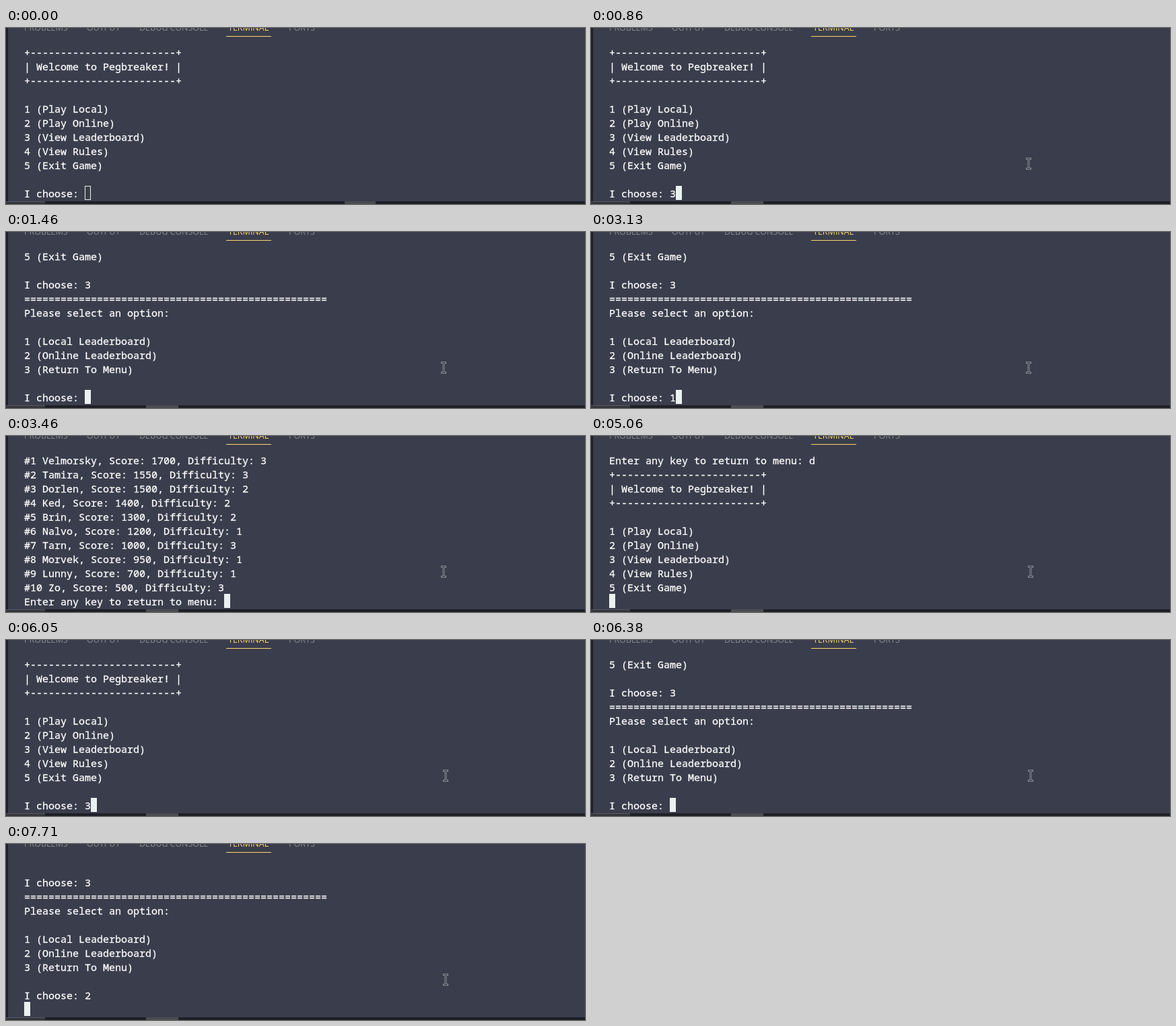
Animation of 860 by 262 pixels, one loop 8 s. Source, as an HTML page:

```html
<!DOCTYPE html>
<html lang="en">
<head>
<meta charset="utf-8">
<title>Terminal game</title>
<style>
html, body { margin: 0; width: 100%; height: 100%; overflow: hidden; background: #3a3d4b; }
svg { display: block; width: 860px; height: 262px; }
text { white-space: pre; }
.term {
  font: 15px "Noto Sans Mono", "DejaVu Sans Mono", monospace;
  fill: #fff; stroke: #fff; stroke-width: .3px;
}
.tabs { font: 12.5px "Open Sans", "Noto Sans", sans-serif; fill: #888d94; }
.tabs .on { fill: #ffd76d; }

.screen, .key, .cursor, .pointer, .idle, .focus { animation: 8s step-end infinite; }
.screen, .key { opacity: 0; }
.menu { animation-name: menu; }
.boards { animation-name: boards; }
.scores { animation-name: scores; }
.back { animation-name: back; }
.sent { animation-name: sent; }
.key3 { animation-name: key3; }
.key1 { animation-name: key1; }
.key2 { animation-name: key2; }
.keyD { animation-name: keyD; }
.cursor { animation-name: cursor; }
.pointer { animation-name: pointer; }
.idle { animation-name: idle; }
.focus { animation-name: focus; }

@keyframes menu { 0%, 64.125% { opacity: 1 } 18.25%, 79.75%, 100% { opacity: 0 } }
@keyframes boards { 0%, 43.25%, 96.375%, 100% { opacity: 0 } 18.25%, 79.75% { opacity: 1 } }
@keyframes scores { 0%, 63.25%, 100% { opacity: 0 } 43.25% { opacity: 1 } }
@keyframes back { 0%, 64.125%, 100% { opacity: 0 } 63.25% { opacity: 1 } }
@keyframes sent { 0%, 100% { opacity: 0 } 96.375% { opacity: 1 } }
@keyframes key3 { 0%, 18.25%, 79.75%, 100% { opacity: 0 } 10.75%, 75.625% { opacity: 1 } }
@keyframes key1 { 0%, 43.25%, 100% { opacity: 0 } 39.125% { opacity: 1 } }
@keyframes key2 { 0%, 96.375%, 100% { opacity: 0 } 93.125% { opacity: 1 } }
@keyframes keyD { 0%, 63.25%, 100% { opacity: 0 } 61.5% { opacity: 1 } }
@keyframes idle { 0% { opacity: 1 } 5.75%, 100% { opacity: 0 } }
@keyframes focus { 0% { opacity: 0 } 5.75%, 100% { opacity: 1 } }
@keyframes cursor {
  0%, 18.25%, 64.125%, 79.75% { transform: translate(117px, 235px) }
  10.75%, 39.125%, 75.625%, 93.125% { transform: translate(126px, 235px) }
  43.25% { transform: translate(324px, 235px) }
  61.5% { transform: translate(333px, 235px) }
  63.25%, 96.375%, 100% { transform: translate(27px, 235px) }
}
@keyframes pointer {
  0% { transform: translate(720px, 280px) }
  .875% { transform: translate(720px, 232px) }
  1.75% { transform: translate(700px, 208px) }
  2.625% { transform: translate(680px, 194px) }
  3.75% { transform: translate(662px, 189px) }
  4.875%, 5.75% { transform: translate(646px, 193px) }
  53.25% { transform: translate(648px, 193px) }
  54%, 100% { transform: translate(649px, 193px) }
}
</style>
</head>
<body>
<svg viewBox="0 0 860 262">
  <rect width="860" height="262" fill="#3a3d4b"/>
  <rect width="3" height="262" fill="#1e1f2b"/>

  <g class="tabs">
    <text x="27" y="4">PROBLEMS</text>
    <text x="120" y="4">OUTPUT</text>
    <text x="198" y="4">DEBUG CONSOLE</text>
    <text x="330" y="4" class="on">TERMINAL</text>
    <text x="420" y="4">PORTS</text>
  </g>
  <rect x="327" y="12" width="67" height="1" fill="#ffd76d"/>

  <g class="term" id="term"></g>

  <g class="cursor">
    <rect class="idle" x=".5" y=".5" width="8" height="20" fill="none" stroke="#eaf2f1"/>
    <rect class="focus" width="9" height="21" fill="#eaf2f1"/>
  </g>

  <g class="pointer" fill="none" stroke-linecap="square">
    <path d="M1.5 1.5H6.5M4 1.5V16.5M1.5 16.5H6.5" stroke="#8d8f99" stroke-width="3"/>
    <path d="M1.5 1.5H6.5M4 1.5V16.5M1.5 16.5H6.5" stroke="#30323d"/>
  </g>

  <rect y="258" width="860" height="4" fill="#1e1f26"/>
  <rect y="258" width="58" height="4" fill="#34353b"/>
  <rect y="258" width="58" height="1" fill="#595a60"/>
  <rect class="idle" x="503" y="258" width="46" height="4" fill="#4c4c51"/>
  <rect class="focus" x="208" y="258" width="48" height="4" fill="#4c4c51"/>
</svg>
<script>
const term = document.getElementById('term');
const left = 27, advance = 9, lineHeight = 21, baseline = 42;

function put(parent, line, col, row) {
  const el = document.createElementNS(term.namespaceURI, 'text');
  el.setAttribute('x', left + col * advance);
  el.setAttribute('y', baseline + row * lineHeight);
  el.textContent = line;
  parent.append(el);
  return el;
}

function screen(name, lines) {
  const g = document.createElementNS(term.namespaceURI, 'g');
  g.setAttribute('class', 'screen ' + name);
  lines.forEach((line, row) => line && put(g, line, 0, row));
  term.append(g);
}

function key(name, char, col) {
  put(term, char, col, 10).setAttribute('class', 'key ' + name);
}

const rule = '+' + '-'.repeat(24) + '+';
const exit = '5 (Exit Game)';
const prompt = 'I choose: ';
const wait = 'Enter any key to return to menu: ';
const menu = [rule, '| Welcome to Pegbreaker! |', rule, '',
  '1 (Play Local)', '2 (Play Online)', '3 (View Leaderboard)', '4 (View Rules)', exit];
const boards = ['', prompt + '3', '='.repeat(50), 'Please select an option:', '',
  '1 (Local Leaderboard)', '2 (Online Leaderboard)', '3 (Return To Menu)', ''];
const scores = [
  ['Velmorsky', 1700, 3], ['Tamira', 1550, 3], ['Dorlen', 1500, 2], ['Ked', 1400, 2],
  ['Brin', 1300, 2], ['Nalvo', 1200, 1], ['Tarn', 1000, 3], ['Morvek', 950, 1],
  ['Lunny', 700, 1], ['Zo', 500, 3]
].map(([name, score, level], i) => `#${i + 1} ${name}, Score: ${score}, Difficulty: ${level}`);

screen('menu', [...menu, '', prompt]);
screen('boards', [exit, ...boards, prompt]);
screen('scores', [...scores, wait]);
screen('back', [wait + 'd', ...menu]);
screen('sent', [...boards, prompt + '2']);
key('key3', '3', prompt.length);
key('key1', '1', prompt.length);
key('key2', '2', prompt.length);
key('keyD', 'd', wait.length);
</script>
</body>
</html>
```
